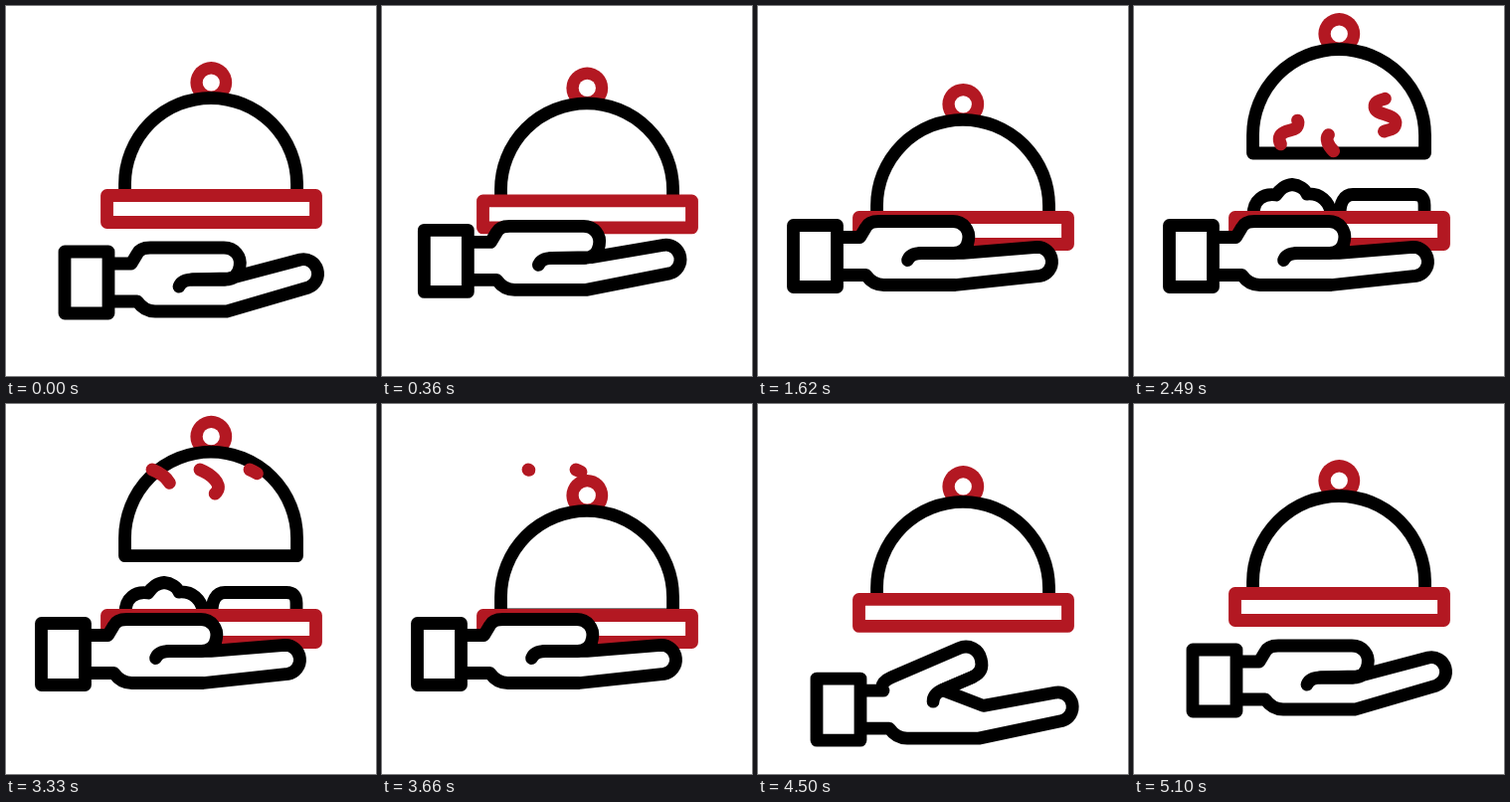
An HTML page for the animation above (5400 ms loop, 372x372 px).

```html
<!DOCTYPE html>
<html lang="en">
<head>
<meta charset="utf-8">
<title>Serving hand</title>
<style>
  html, body { margin: 0; width: 100%; height: 100%; overflow: hidden; background: #fff; }
  svg { display: block; width: 100vw; height: 100vh; }
  path, rect { fill: #fff; stroke: #000; stroke-width: 12.8; stroke-linecap: round; stroke-linejoin: round; }
  .red { stroke: #b31822; }
  .line { fill: none; }
</style>
</head>
<body>
<svg viewBox="0 0 372 372">
  <g id="dish">
    <path d="M120 210C120 195 130 188 143 190C146 185 152 180 159 179.5C166 180 172 184 174 189C187 188 196 196 199 210"/>
    <path d="M207 210C207 198 211 189.5 220 189.5H282Q292 189.5 292 200V210"/>
    <g id="lid">
      <circle cx="206.3" cy="99" r="20.9" fill="#b31822"/>
      <circle cx="206.3" cy="99" r="8.6" fill="#fff"/>
      <path d="M119.5 219V201A86.5 86.5 0 0 1 292.5 201V219Z"/>
    </g>
    <rect class="red" x="101.5" y="212.5" width="210" height="27"/>
  </g>
  <g id="steam"></g>
  <g id="hand">
    <path id="palm"/>
    <path id="crease" class="line"/>
    <rect x="-22" y="-31" width="44" height="62"/>
  </g>
</svg>
<script>
const LOOP = 5400, STEP = 30;
const $ = id => document.getElementById(id);
const mix = (a, b, k) => a + (b - a) * k;
const ease = (t, from, to) => {
  const x = Math.min(1, Math.max(0, (t - from) / (to - from)));
  return x * x * (3 - 2 * x);
};

// Hand poses: cuff centre x, y, thumb angle, finger angle (degrees)
const OPEN = [81, 278, 0, 0];
const TOUCH = [57.5, 247.5, 0, 7.3];
const HOLD = [57.5, 251.5, 0, 10.2];
const DROP = [81, 308, -24, 4.6];
const moves = [
  [0, 560, OPEN, TOUCH],
  [570, 1110, TOUCH, HOLD],
  [3750, 4430, HOLD, DROP],
  [4430, 5110, DROP, OPEN]
];

function poseAt(t) {
  let pose = OPEN;
  for (const [from, to, a, b] of moves) {
    if (t >= from) pose = a.map((v, i) => mix(v, b[i], ease(t, from, to)));
  }
  return pose;
}

// Returns a function that turns "x,y" pairs of a path around a pivot
function turner(px, py, deg) {
  const c = Math.cos(deg * Math.PI / 180), s = Math.sin(deg * Math.PI / 180);
  return d => d.replace(/(-?[\d.]+),(-?[\d.]+)/g, (_, x, y) => {
    const dx = x - px, dy = y - py;
    return (px + dx * c - dy * s).toFixed(2) + "," + (py + dx * s + dy * c).toFixed(2);
  });
}

function drawHand(t) {
  const [x, y, thumbDeg, fingerDeg] = poseAt(t);
  const thumb = turner(65, -7, thumbDeg), finger = turner(141, 29, fingerDeg);
  $("hand").setAttribute("transform", `translate(${x} ${y})`);
  $("palm").setAttribute("d", "M22 -19H45" +
    thumb("L51,-29Q54,-35 64,-35L138,-35C149,-35 156,-26 154,-16Q152,-3 139,-3L106,-3") +
    finger("L143,-4L215,-23") + "A14.6 14.6 0 0 1 " + finger("223,5") +
    "L141 29H69Q58 29 51 19H22");
  $("crease").setAttribute("d", thumb("M139,-3L107,-3Q96,-3 93,4"));
}

// One wavy plume, repeated; each starts a little later
const WAVE = "M12 151C-1 142 -5 131 4 127C11 124 18 125 18 117C17 108 -2 110 -3 102C-4 92 13 95 17 88C23 80 10 70 0 66";
const plumes = [[245, 1965], [147, 2135], [195, 2250]].map(([x, start]) => {
  const el = document.createElementNS("http://www.w3.org/2000/svg", "path");
  el.setAttribute("d", WAVE);
  el.setAttribute("class", "red line");
  el.setAttribute("pathLength", 1);
  el.setAttribute("transform", `translate(${x} 0)`);
  $("steam").append(el);
  return { el, start };
});

function drawSteam(t) {
  for (const { el, start } of plumes) {
    const head = ease(t, start, start + 840), tail = ease(t, start, start + 1610);
    const len = head - tail;
    el.style.display = len > 0.004 ? "" : "none";
    el.setAttribute("stroke-dasharray", `${len} 3`);
    el.setAttribute("stroke-dashoffset", -tail);
  }
}

function draw(t) {
  const sink = ease(t, 0, 1110) - ease(t, 3750, 4890);
  const lift = ease(t, 1605, 2115) - ease(t, 3250, 3760);
  $("dish").setAttribute("transform", `translate(0 ${22 * (sink - 1)})`);
  $("lid").setAttribute("transform", `translate(0 ${-71 * lift})`);
  drawSteam(t);
  drawHand(t);
}

const begin = performance.now();
function tick() {
  const t = (performance.now() - begin) % LOOP;
  draw(Math.floor(t / STEP) * STEP);
  requestAnimationFrame(tick);
}
tick();
</script>
</body>
</html>
```
